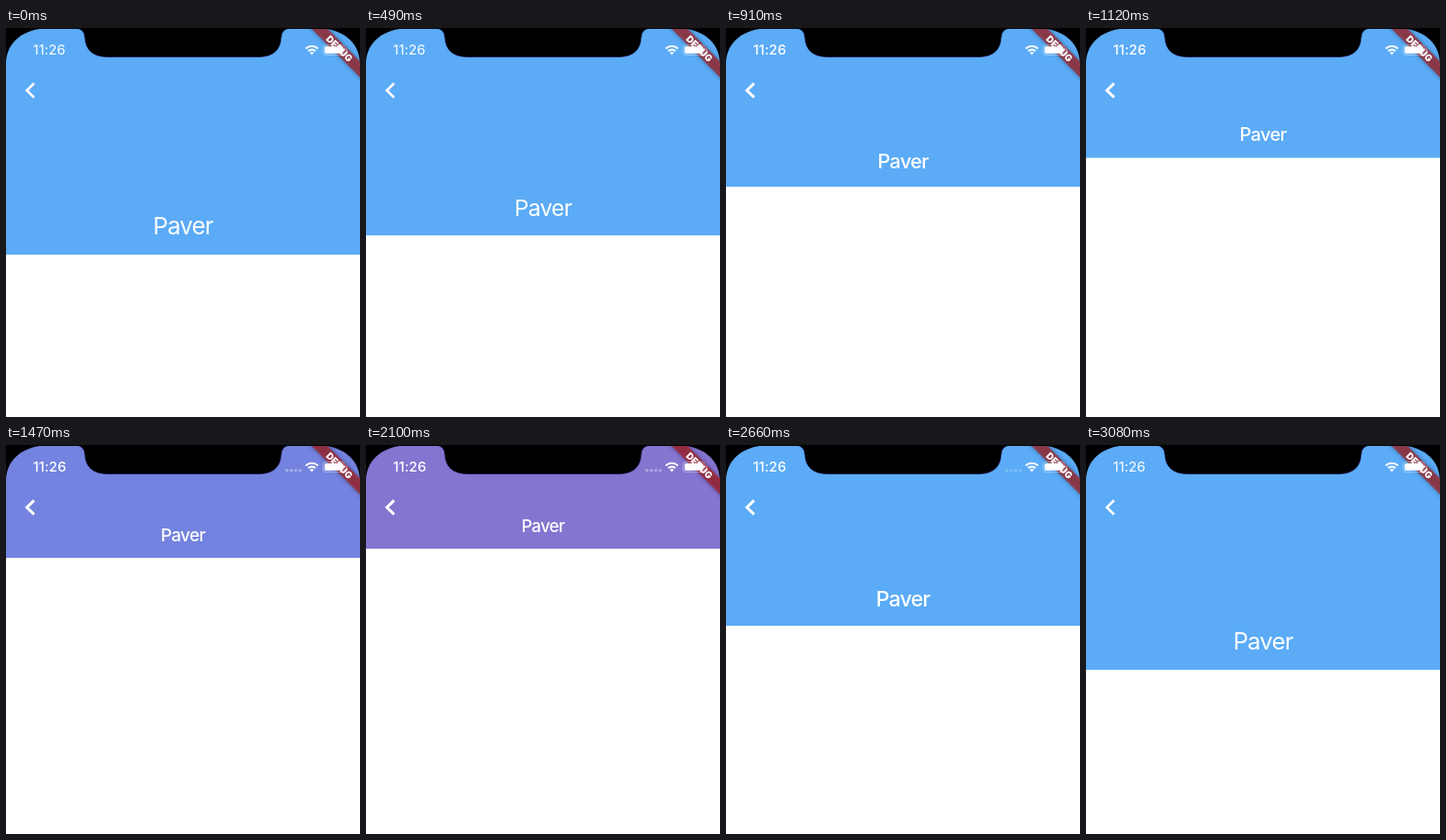
An HTML page for the animation above (3.15 s loop, 386 by 424 pixels).

```html
<!DOCTYPE html>
<html lang="en">
<head>
<meta charset="utf-8">
<title>Collapsing header</title>
<style>
  html, body { margin: 0; width: 100%; height: 100%; overflow: hidden; background: #fff; }
  svg { display: block; width: 386px; height: 424px; }
  text { font-family: Inter, "Liberation Sans", sans-serif; fill: #fff; }
</style>
</head>
<body>
<svg viewBox="0 0 386 424">
  <defs>
    <filter id="soft" x="-20%" y="-80%" width="140%" height="260%">
      <feGaussianBlur stdDeviation="2"/>
    </filter>
  </defs>
  <rect width="386" height="424" fill="#fff"/>
  <rect id="header" width="386" height="247"/>
  <text id="title" x="193" text-anchor="middle" letter-spacing="-0.035em">Paver</text>
  <path id="back" d="M30.6 60.3 L22.8 68 L30.6 75.7" fill="none" stroke="#fff"/>

  <g transform="translate(363.5 22.5) rotate(45)">
    <rect x="-60" y="-6.2" width="120" height="12.4" fill="#000" opacity=".4" filter="url(#soft)"/>
    <rect x="-60" y="-6.2" width="120" height="12.4" fill="#b71c1c" opacity=".63"/>
    <text y="3.7" text-anchor="middle" font-size="10.3" font-weight="900">DEBUG</text>
  </g>

  <text id="clock" x="29.5" y="29.2" font-size="15" letter-spacing=".1">11:26</text>
  <g id="dots" fill="#fff">
    <circle cx="306.2" cy="27.8" r="1.8"/>
    <circle cx="311.1" cy="27.8" r="1.8"/>
    <circle cx="316" cy="27.8" r="1.8"/>
    <circle cx="320.9" cy="27.8" r="1.8"/>
  </g>
  <g fill="none" stroke="#fff" stroke-width="2.1">
    <path d="M326.9 22.4 A9.4 9.4 0 0 1 340.1 22.4"/>
    <path d="M329.6 25.2 A5.5 5.5 0 0 1 337.4 25.2"/>
    <path d="M331.3 27 A3.1 3.1 0 0 1 335.7 27 L333.5 29.3 Z" fill="#fff" stroke="none"/>
  </g>
  <rect x="345.9" y="18.4" width="23.4" height="11" rx="3" fill="none" stroke="#fff" opacity=".4"/>
  <rect x="347.5" y="20" width="20.2" height="7.8" rx="1.6" fill="#fff"/>
  <path d="M370.6 22 q1.8 .6 1.8 2 t-1.8 2 z" fill="#fff" opacity=".5"/>

  <path d="M0 0 H46 C20 1 1 14 0 38 Z M386 0 H340 C366 1 385 14 386 38 Z"/>
  <path d="M76 0 Q85.5 1 86 10 Q87 31 110 31.5 H276 Q299 31 300 10 Q300.5 1 310 0 Z"
        stroke="#1b1645" stroke-width=".8"/>
  <rect width="386" height="1"/>
</svg>
<script>
const LOOP = 3150, STEP = 70;
// [time, header height]
const drag = [[0, 247], [490, 226], [560, 213.5], [910, 173], [1120, 141.5], [1470, 123],
  [1540, 123], [1820, 104], [2100, 113], [2660, 197], [3080, 245], [LOOP, 247]];
// [header height, r, g, b]
const tints = [[104, 150, 101, 193], [113, 133, 116, 208], [123, 115, 131, 223], [137, 91, 171, 246]];
const $ = id => document.getElementById(id);
const [header, title, back, clock, dots] = ['header', 'title', 'back', 'clock', 'dots'].map($);

const slope = i => (drag[i + 1][1] - drag[i][1]) / (drag[i + 1][0] - drag[i][0]);

function tangent(i) {
  if (i === 0 || i === drag.length - 1) return 0;
  const a = slope(i - 1), b = slope(i);
  return a * b > 0 ? 2 * a * b / (a + b) : 0;
}

// Monotone cubic interpolation of the drag
function heightAt(t) {
  const i = Math.max(0, drag.findIndex(p => p[0] > t) - 1);
  const [t0, h0] = drag[i], [t1, h1] = drag[i + 1];
  const d = t1 - t0, u = (t - t0) / d, v = 1 - u;
  return v * v * (1 + 2 * u) * h0 + u * u * (3 - 2 * u) * h1
    + d * u * v * (v * tangent(i) - u * tangent(i + 1));
}

function tintAt(h) {
  let i = 0;
  while (i < tints.length - 2 && h > tints[i + 1][0]) i++;
  const a = tints[i], b = tints[i + 1];
  const u = Math.min(1, Math.max(0, (h - a[0]) / (b[0] - a[0])));
  return `rgb(${[1, 2, 3].map(k => Math.round(a[k] + (b[k] - a[k]) * u))})`;
}

function render(now) {
  const t = Math.floor((now % LOOP) / STEP) * STEP;
  const h = heightAt(t);
  const strong = t >= 630 && t < 2730;
  header.setAttribute('height', h);
  header.setAttribute('fill', tintAt(h));
  title.setAttribute('y', h - 18 - (h - 113) * 0.03);
  title.setAttribute('font-size', 18.5 + (h - 113) * 0.056);
  title.setAttribute('font-weight', strong ? 500 : 400);
  clock.setAttribute('font-weight', strong ? 500 : 400);
  back.setAttribute('stroke-width', strong ? 3.1 : 2.7);
  dots.setAttribute('opacity', t < 1190 || t >= 2730 ? 0 : t < 2170 ? 0.35 : 0.2);
}

const start = performance.now();
function tick() {
  render(performance.now() - start);
  requestAnimationFrame(tick);
}
tick();
</script>
</body>
</html>
```
